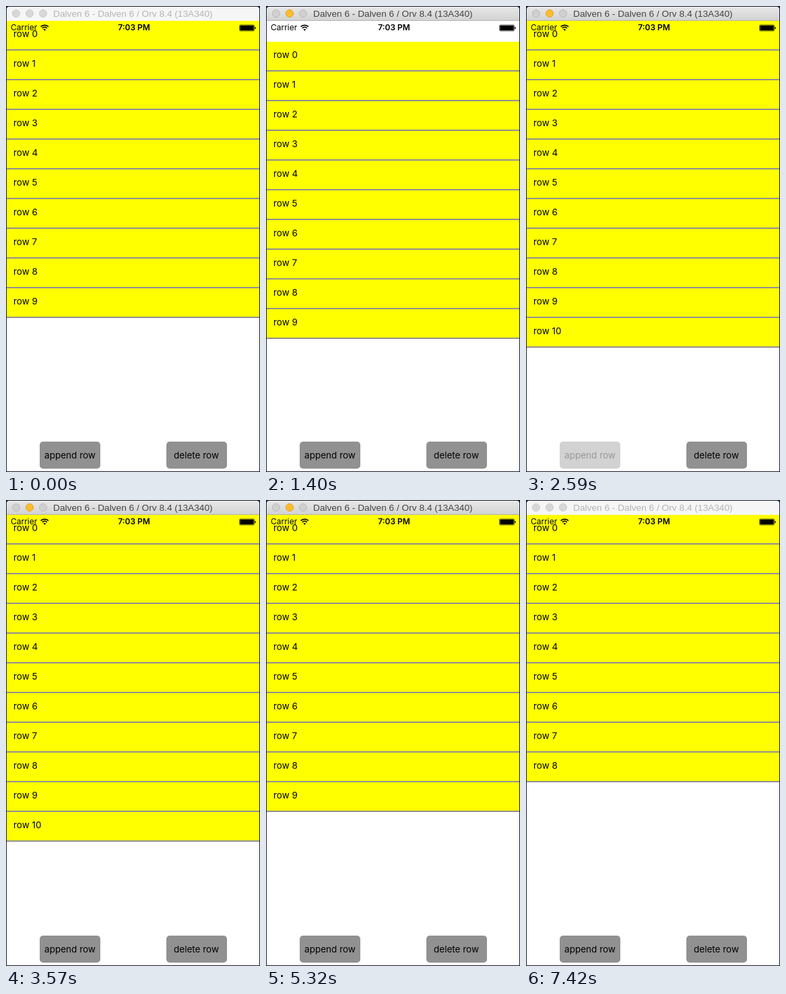
These frames come from a looping animation (377 by 690 pixels, 7.56 s). An HTML page:

```html
<!DOCTYPE html>
<html lang="en">
<head>
<meta charset="utf-8">
<title>Row list</title>
<style>
  html, body { margin: 0; width: 100%; height: 100%; overflow: hidden; }
  body { position: relative; background: #1c1c2a; font: 13.5px Inter, Roboto, sans-serif; color: #000; }
  body div, svg { position: absolute; }

  #bar {
    left: 1px; top: 1px; width: 375px; height: 21px; box-sizing: border-box;
    border-radius: 4px 4px 0 0; background: #f6f6f6; color: #b4b4b4;
    font: 13.7px/21px "Liberation Sans", Arial, sans-serif; white-space: pre;
  }
  #bar.active { background: linear-gradient(#e8e8e8, #d3d3d3); border-bottom: 1px solid #b4b4b4; color: #444; }
  #bar span { position: absolute; left: 69px; top: 0; }
  #bar i {
    position: absolute; top: 4px; width: 12px; height: 12px; box-sizing: border-box;
    border-radius: 50%; background: #d8d8d8; border: 1px solid #cbcbcb;
  }
  #bar.active i { background: #d0d0d0; border-color: #bababa; }
  #bar.active i:nth-child(2) { background: #fdbd2f; border-color: #e2a022; }

  #screen { left: 1px; top: 22px; width: 375px; height: 667px; background: #fff; overflow: hidden; }
  #list { left: 0; top: 0; width: 375px; }
  .row { width: 375px; height: 42px; border-bottom: 2px solid #919191; }
  .row div { width: 365px; height: 42px; padding-left: 10px; line-height: 38px; background: #ff0; }

  .status { top: 0; font-size: 12px; line-height: 20px; white-space: pre; }
  .button {
    top: 623px; width: 90px; height: 40px; border-radius: 5px;
    background: #919191; line-height: 40px; text-align: center; white-space: pre;
  }
</style>
</head>
<body>
<div id="bar"><i style="left:8px"></i><i style="left:28px"></i><i style="left:48px"></i><span>Dalven 6 - Dalven 6 / Orv 8.4 (13A340)</span></div>
<div id="screen">
  <div id="list"></div>
  <div class="status" style="left:6px">Carrier</div>
  <div class="status" style="left:139px; width:100px; text-align:center; font-weight:600">7:03 PM</div>
  <svg width="375" height="20" style="left:0; top:0">
    <g fill="none" stroke="#000" stroke-width="1.7">
      <path d="M50.6 8.7a8.1 8.1 0 0 1 11.4 0M52.8 10.9a5 5 0 0 1 7 0"/>
      <path d="M56.3 14.7l-1.8-1.9a2.6 2.6 0 0 1 3.6 0z" fill="#000" stroke="none"/>
    </g>
    <rect x="345.5" y="6" width="22" height="9" rx="1.5" fill="none" stroke="#000" stroke-width=".6"/>
    <rect x="346.3" y="6.8" width="20.4" height="7.4" rx=".8"/>
    <path d="M368.4 8.8q1.6 .4 1.6 1.7t-1.6 1.7z"/>
  </svg>
  <div class="button" id="append" style="left:49px">append row</div>
  <div class="button" id="remove" style="left:236.5px">delete row</div>
</div>
<script>
  const LOOP = 7560, STEP = 70, ROW = 44, PULL = 68;
  const $ = id => document.getElementById(id);

  const rows = Array.from({ length: 11 }, (_, i) => {
    const row = document.createElement('div');
    row.className = 'row';
    row.style.top = i * ROW + 'px';
    row.innerHTML = `<div>row ${i}</div>`;
    $('list').append(row);
    return row;
  });

  // Pulled down by the drag, then a critically damped spring back.
  function pullOffset(t) {
    if (t < 930 || t >= 1890) return 0;
    if (t <= 1190) return PULL * Math.sin((t - 930) / 260 * Math.PI / 2);
    const x = Math.max(0, t - 1230) * 0.0109;
    return PULL * (1 + x) * Math.exp(-x);
  }

  const rowCount = t => t < 2590 ? 10 : t < 4270 ? 11 : t < 6230 ? 10 : 9;
  const within = (t, start, length) => t >= start && t < start + length;
  const press = (el, down) => el.style.opacity = down ? 0.4 : 1;

  function draw(t) {
    $('bar').className = within(t, 910, 6510) ? 'active' : '';
    $('list').style.top = Math.round(pullOffset(t) * 2) / 2 + 'px';
    const count = rowCount(t);
    rows.forEach((row, i) => row.style.display = i < count ? '' : 'none');
    press(rows[10].firstChild, within(t, 3430, 140));
    press(rows[9].firstChild, within(t, 5250, 70));
    press($('append'), within(t, 2590, 140));
    press($('remove'), within(t, 4270, 140) || within(t, 6230, 140));
  }

  const start = performance.now();
  function tick() {
    const t = (performance.now() - start) % LOOP;
    draw(Math.floor(t / STEP) * STEP);
    requestAnimationFrame(tick);
  }
  tick();
</script>
</body>
</html>
```
